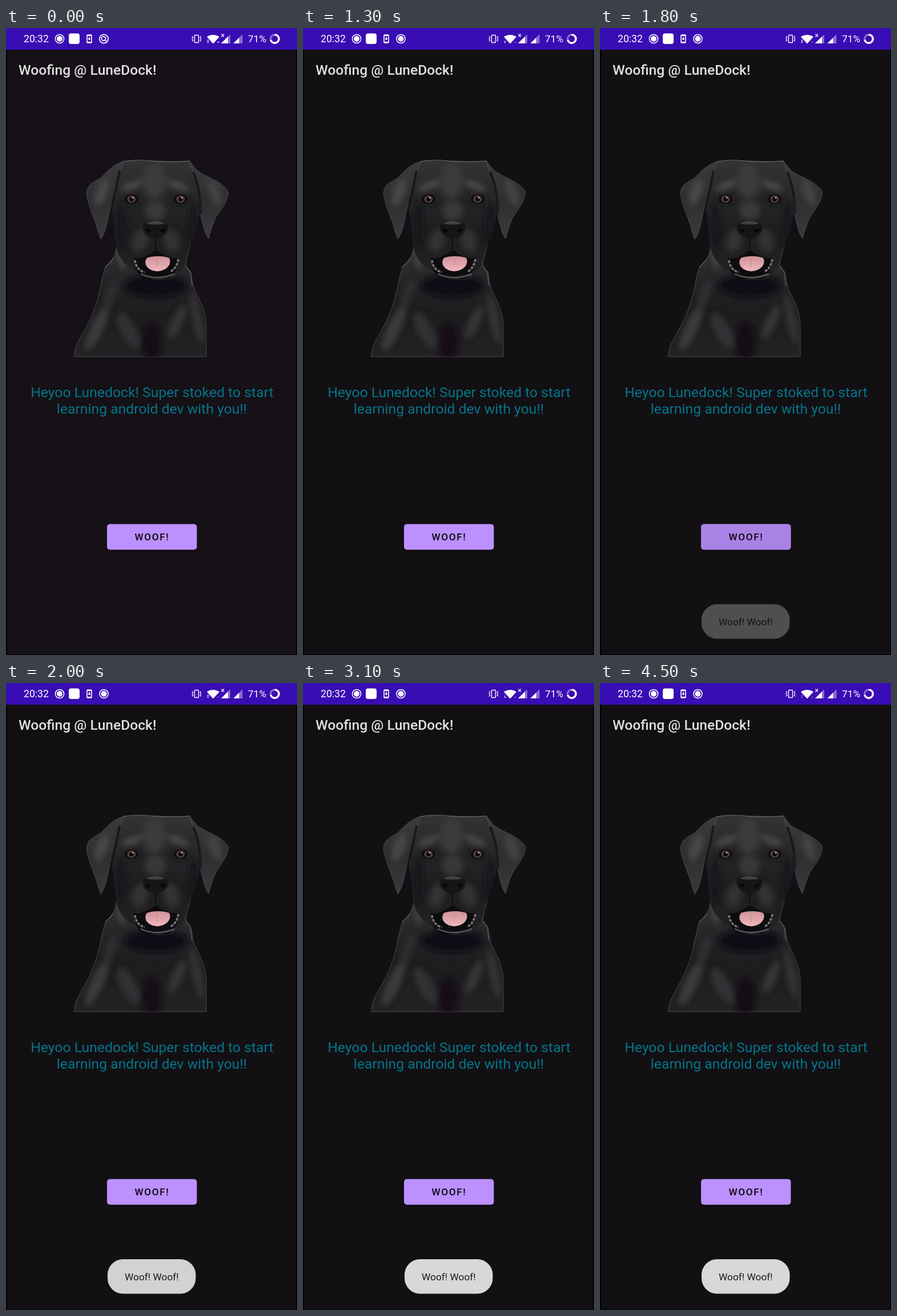
These frames come from a looping animation (510 px wide and 1099 px high, 4.6 s). An HTML page:

```html
<!DOCTYPE html>
<html lang="en">
<head>
<meta charset="utf-8">
<title>Woofing</title>
<style>
html, body { margin: 0; width: 100%; height: 100%; overflow: hidden; background: #000; }
svg { display: block; width: 100%; height: 100%; }
text { font-family: Roboto, sans-serif; }
.medium { font-weight: 500; }
</style>
</head>
<body>
<svg viewBox="0 0 510 1099" xmlns="http://www.w3.org/2000/svg">
  <defs>
    <linearGradient id="fur" x1="0" y1="0" x2="0" y2="1">
      <stop offset="0" stop-color="#343335"/>
      <stop offset=".3" stop-color="#272628"/>
      <stop offset=".6" stop-color="#1d1c1e"/>
      <stop offset="1" stop-color="#232224"/>
    </linearGradient>
    <linearGradient id="ear" x1="0" y1="0" x2="0" y2="1">
      <stop offset="0" stop-color="#3b3a3c"/>
      <stop offset=".5" stop-color="#2e2d2f"/>
      <stop offset="1" stop-color="#3a393b"/>
    </linearGradient>
    <linearGradient id="tongue" x1="0" y1="0" x2="0" y2="1">
      <stop offset="0" stop-color="#cf9299"/>
      <stop offset="1" stop-color="#efb7bd"/>
    </linearGradient>
    <filter id="soft" x="-50%" y="-50%" width="200%" height="200%"><feGaussianBlur stdDeviation="5"/></filter>
    <filter id="glow" x="-60%" y="-60%" width="220%" height="220%"><feGaussianBlur stdDeviation="1.5"/></filter>
    <path id="body" d="M194 380 C193 400 186 406 174 420 C167 440 166 462 156 490
      C146 520 127 545 122 561 L119 576 H351 V520 C350 498 342 482 333 464
      C326 452 327 440 324 428 L315 417 C316 400 322 390 324 375 Z"/>
    <path id="head" d="M205 234 C225 230 240 234 255 233 C275 231 300 236 322 233
      C338 252 342 285 339 325 C336 350 325 375 319 392 C315 415 304 435 288 440
      C268 444 245 442 232 430 C213 418 200 408 195 390 C190 370 189 345 186 318
      C184 282 190 252 205 234 Z"/>
    <path id="earL" d="M206 234 C190 238 178 250 167 262 C156 270 142 272 141 291
      C144 312 156 335 161 355 L166 370 C174 360 178 340 181 322
      C186 305 193 282 196 264 Z"/>
    <path id="earR" d="M321 233 L334 249 C350 262 380 268 390 288 C388 304 378 317 368 331
      C362 345 358 357 355 369 C347 358 345 341 340 324 C345 300 334 272 329 258 Z"/>
    <clipPath id="dogClip"><use href="#body"/><use href="#head"/><use href="#earL"/><use href="#earR"/></clipPath>
    <clipPath id="btnClip"><rect x="177" y="869.5" width="157.5" height="45" rx="5"/></clipPath>
  </defs>

  <rect width="510" height="1099" fill="#000"/>
  <rect id="page" x="2" y="38" width="506.5" height="1060"/>
  <rect width="510" height="38" fill="#390db4"/>

  <g fill="#fff" stroke="none">
    <text x="31" y="25" font-size="17.6">20:32</text>
    <g id="rec">
      <circle cx="94" cy="19" r="7.6" fill="none" stroke="#fff" stroke-width="1.5"/>
      <circle cx="94" cy="19" r="5"/>
    </g>
    <rect x="110" y="9.5" width="19" height="18.5" rx="4"/>
    <rect x="142" y="12" width="8" height="14" rx="1.2" fill="none" stroke="#fff" stroke-width="1.6"/>
    <path d="M142 12h8v2h-8zM142 24h8v2h-8zM145.2 15.5h1.6v3h2L146 21.8l-2.8-3.300h2z"/>
    <use id="rec2" href="#rec" x="77.500"/>
    <g id="search" fill="none" stroke="#fff" stroke-width="1.7">
      <circle cx="171.500" cy="19" r="7.700"/>
      <circle cx="171" cy="18.500" r="3.600"/>
      <path d="M173.500 21l4 4"/>
    </g>

    <g fill="none" stroke="#fff" stroke-width="1.4">
      <rect x="330.500" y="12.500" width="7" height="13" rx=".8"/>
      <path d="M326 14.500l2 2-2 2.500 2 2.500-2 2M342 14.500l-2 2 2 2.500-2 2.500 2 2" stroke-width="1.2"/>
    </g>
    <path d="M352 15.500C358 10.800 368 10.800 374 15.500L363 27.500Z"/>
    <path id="up" d="M352 22.500l2-2.300 2 2.300z"/>
    <path id="down" d="M352 24l2 2.300 2-2.300z"/>
    <path id="side" d="M370 24l2 2.300 2-2.300z"/>
    <path d="M377.500 10.500l4.500 5M382 10.500l-4.500 5" stroke="#fff" stroke-width="1.2"/>
    <path d="M393 11V27H377Z" opacity=".4"/>
    <path d="M389 15V27H377Z"/>
    <path d="M414.500 11V27H398.500Z" opacity=".4"/>
    <path d="M408.500 17V27H398.500Z"/>
    <text x="424" y="25" font-size="17.4">71%</text>
    <circle cx="471" cy="19" r="7.300" fill="none" stroke="#fff" stroke-opacity=".4" stroke-width="3.300"/>
    <circle cx="471" cy="19" r="7.300" fill="none" stroke="#fff" stroke-width="3.300"
      pathLength="100" stroke-dasharray="71 29" transform="rotate(-90 471 19)"/>
  </g>

  <text class="medium" x="22" y="81.500" font-size="24.6" fill="#e1e0e1">Woofing @ LuneDock!</text>

  <g id="dog">
    <use href="#body" fill="url(#fur)" stroke="#4a494b"/>
    <g clip-path="url(#dogClip)">
      <g filter="url(#soft)" id="chest"></g>
    </g>
    <use href="#head" fill="url(#fur)"/>
    <use href="#earL" fill="url(#ear)" stroke="#555456" stroke-width=".8"/>
    <use href="#earR" fill="url(#ear)" stroke="#555456" stroke-width=".8"/>
    <g clip-path="url(#dogClip)">
      <g filter="url(#soft)" id="face"></g>
      <path d="M199 250Q193 284 184 318M328 252Q343 288 341 326" fill="none" stroke="#111012" stroke-width="4" opacity=".8"/>
    </g>
    <path d="M205 234Q230 230 255 233T322 233" fill="none" stroke="#777578" stroke-width="1"/>
    <path d="M174 419L188 405M316 418l7 10 3 24" fill="none" stroke="#69686a" stroke-width="1.500" stroke-dasharray="3 1.500"/>
    <g id="eyes"></g>
    <path d="M240 347C246 334 278 334 284 347C286 360 274 368 262 369C250 368 238 360 240 347Z" fill="#161517"/>
    <path d="M245 343Q262 333 279 343Q262 346 245 343Z" fill="#414043"/>
    <path d="M244 353q6-3 10 3q-5 6-10-3zM280 353q-6-3-10 3q5 6 10-3z" fill="#070708"/>
    <path d="M262 368V388" stroke="#0d0c0e" stroke-width="2"/>
    <path d="M224 403C235 407 250 398 263 389C277 399 290 406 303 403C302 420 294 438 282 440H245C231 436 225 420 224 403Z" fill="#0d0c0e"/>
    <path d="M226 407Q228 424 243 428M302 405Q299 422 288 427" fill="none" stroke="#a09b9b" stroke-width="3.500" stroke-dasharray="5 2" opacity=".75"/>
    <path d="M247 403C257 399 276 399 286 403C291 412 284 425 265 426.500C247 425 240 413 247 403Z" fill="url(#tongue)"/>
    <path d="M265 403V419" stroke="#bd7e87" opacity=".6"/>
    <path d="M236 431Q264 444 296 431" fill="none" stroke="#525053" stroke-width="3"/>
  </g>

  <g font-size="24.75" fill="#05758b" text-anchor="middle">
    <text x="256" y="647">Heyoo Lunedock! Super stoked to start</text>
    <text x="255.500" y="676">learning android dev with you!!</text>
  </g>

  <rect x="177" y="871" width="157.500" height="45" rx="5" fill="#000" opacity=".5" filter="url(#glow)"/>
  <rect x="177" y="869.500" width="157.500" height="45" rx="5" fill="#bc91ff"/>
  <g clip-path="url(#btnClip)"><circle id="ripple" fill="#9370c8"/></g>
  <text class="medium" x="225.500" y="898.300" font-size="17.3" letter-spacing="1.55" fill="#0b0810">WOOF!</text>
  <g id="touch">
    <circle r="14.500" fill="#d9c2fa" opacity=".35" filter="url(#glow)"/>
    <circle r="12.500" fill="#d3c2ea" opacity=".85"/>
  </g>

  <g id="toast">
    <rect x="178" y="1010" width="154.500" height="60.500" rx="27" fill="#dad7da"/>
    <text x="208" y="1047" font-size="17.3" fill="#1c1a1d">Woof! Woof!</text>
  </g>
</svg>
<script>
const LOOP = 4600;
const $ = id => document.getElementById(id);
const clamp = v => Math.max(0, Math.min(1, v));
const ramp = (t, from, to) => clamp((t - from) / (to - from));
const easeOut = p => 1 - (1 - p) ** 2;

const blob = (x, y, rx, ry, fill, turn = 0) =>
  `<ellipse cx="${x}" cy="${y}" rx="${rx}" ry="${ry}" fill="${fill}" transform="rotate(${turn} ${x} ${y})"/>`;

$('chest').innerHTML =
  blob(262, 452, 55, 20, '#111012') +
  blob(201, 400, 6, 25, '#454446', -10) +
  blob(160, 525, 11, 45, '#3b3a3c', 25) +
  blob(214, 530, 13, 35, '#333234', -28) +
  blob(300, 515, 10, 32, '#353436', 24) +
  blob(335, 510, 9, 45, '#343335', -12) +
  blob(255, 550, 18, 35, '#121113') +
  blob(182, 470, 8, 30, '#302f31', 18);

$('face').innerHTML =
  blob(260, 268, 20, 30, '#3b3a3c') +
  blob(221, 276, 20, 6, '#4b4a4c', -22) +
  blob(301, 276, 20, 6, '#4b4a4c', 22) +
  blob(220, 300, 15, 9, '#171618') +
  blob(306, 300, 15, 9, '#171618') +
  blob(262, 320, 18, 18, '#383739') +
  blob(235, 372, 14, 22, '#303032', 15) +
  blob(290, 372, 14, 22, '#303032', -15) +
  blob(202, 345, 7, 40, '#19181a') +
  blob(328, 345, 7, 40, '#19181a') +
  blob(168, 288, 10, 25, '#474648', 20) +
  blob(366, 288, 10, 25, '#434244', -20);

const eye = x =>
  blob(x, 300, 11, 8, '#0c0b0d') + blob(x, 300, 7.5, 6.5, '#584039') +
  blob(x, 300, 3.8, 4, '#080708') + blob(x + 2, 297.5, 1.5, 1.3, '#c9c5c5');
$('eyes').innerHTML = eye(220) + eye(306);

const taps = [
  { down: 1400, up: 1720, x: 290, y: 892 },
  { down: 2600, up: 2920, x: 289, y: 893.5 }
];

function drawTap(t) {
  const tap = taps.find(p => t >= p.down && t < p.up + 150);
  const shown = tap && t < tap.up;
  $('touch').setAttribute('opacity', shown ? 1 : 0);
  $('ripple').setAttribute('opacity', tap ? 1 - ramp(t, tap.up, tap.up + 150) : 0);
  if (!tap) return;
  $('touch').setAttribute('transform', `translate(${tap.x} ${tap.y})`);
  $('ripple').setAttribute('cx', tap.x);
  $('ripple').setAttribute('cy', tap.y);
  $('ripple').setAttribute('r', 20 + 110 * easeOut(ramp(t, tap.down, tap.down + 180)));
}

// The first toast leaves before the queued one fades in.
function toastAlpha(t) {
  if (t < 3450) return easeOut(ramp(t, 1750, 2050)) * (1 - ramp(t, 3250, 3450));
  return easeOut(ramp(t, 3480, 3770));
}

function draw(t) {
  const settled = t >= 300;
  $('page').setAttribute('fill', settled ? '#121013' : '#151116');
  $('rec2').setAttribute('opacity', settled ? 1 : 0);
  $('search').setAttribute('opacity', settled ? 0 : 1);

  const busy = Math.floor(t / 800) % 2 === 0;
  $('up').setAttribute('opacity', busy ? 1 : .35);
  $('down').setAttribute('opacity', t < 3400 ? 1 : .4);
  $('side').setAttribute('opacity', settled ? .35 : 1);

  drawTap(t);
  $('toast').setAttribute('opacity', toastAlpha(t));
}

const start = performance.now();
function tick() {
  draw((performance.now() - start) % LOOP);
  requestAnimationFrame(tick);
}
tick();
</script>
</body>
</html>
```
